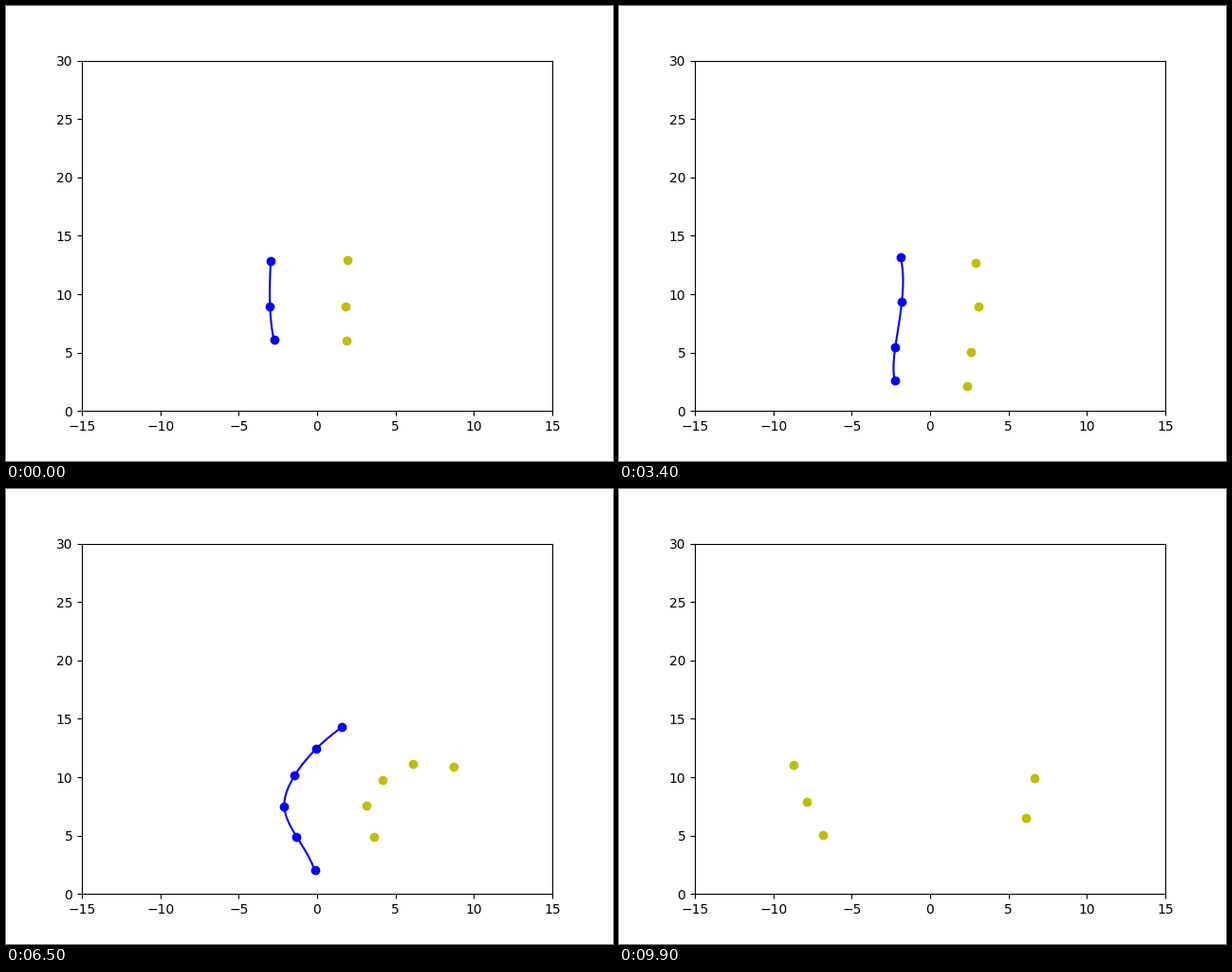
Recreate the animation shown at these times as a matplotlib script. Size 640x480 px, loop 10 s.

```python
import numpy as np
import matplotlib.pyplot as plt
from matplotlib.animation import FuncAnimation

FRAMES, STEP = 100, 100
RANGE, SLOPE = 14.9, 0.727   # sensor reach and edge of its field of view


def glide(t, times, points):
    """Smooth motion through key points, starting from rest."""
    times, points = np.asarray(times, float), np.asarray(points, float)
    rates = np.gradient(points, times, axis=0)
    rates[0] = 0
    t = np.clip(t, times[0], times[-1])
    i = min(np.searchsorted(times, t, side="right") - 1, len(times) - 2)
    h = times[i + 1] - times[i]
    s = (t - times[i]) / h
    rise = s * s * (3 - 2 * s)
    return ((1 - rise) * points[i] + rise * points[i + 1]
            + h * s * (1 - s) * ((1 - s) * rates[i] - s * rates[i + 1]))


def cone_row(*points):
    """Cones along a border: three given, then one between each pair of points."""
    numbers = np.r_[0, 1, 2 * np.arange(1, len(points) - 1)]
    return np.array([glide(k, numbers, points) for k in range(numbers[-1] + 1)])


BLUE = cone_row((-2.75, 6.1), (-3, 8.95), (-2.95, 12.85), (-4.18, 20.11),
                (-6.27, 25.57), (-4.37, 30.53), (-0.61, 33.69), (5.82, 33.54),
                (11.6, 31), (16.4, 27.1))
YELLOW = cone_row((1.88, 6.05), (1.83, 8.95), (1.95, 12.9), (0.6, 19.94),
                  (-1.04, 25.78), (1.8, 29.37), (7.25, 28.4), (11.98, 26.25),
                  (16.01, 21.46))

# Car drive: seconds -> x, y, heading
DRIVE = {1.4: (0, 0, 0), 3.4: (-0.28, 3.7, 0.094), 5.7: (-2.99, 13.74, 0.34),
         7.2: (-4.12, 22.63, -0.29), 8.4: (-1.18, 32.64, -0.653),
         9.9: (3.72, 28.29, -2.745)}


def seen(cones, pose):
    """Cones inside the field of view, in car coordinates."""
    x, y, a = pose
    d = cones - (x, y)
    c, s = np.cos(a), np.sin(a)
    rel = np.column_stack((c * d[:, 0] + s * d[:, 1], c * d[:, 1] - s * d[:, 0]))
    ahead = rel[:, 1] > SLOPE * np.abs(rel[:, 0])
    return rel[ahead & (np.hypot(*rel.T) < RANGE)]


def spline(pts):
    """Interpolating spline over the cone number, cubic where possible."""
    n = len(pts)
    if n < 2:
        return np.empty((0, 2))

    def basis(v):
        powers = [v ** k for k in range(min(4, n))]
        bends = [np.clip(v - k, 0, None) ** 3 for k in range(2, n - 2)]
        return np.column_stack(powers + bends)

    fit = np.linalg.solve(basis(np.arange(float(n))), pts)
    return basis(np.linspace(0, n - 1, 100)) @ fit


def border(pts):
    """Spline through each unbroken run of cones."""
    gaps = np.hypot(*np.diff(pts, axis=0).T) > 6
    parts = []
    for run in np.split(pts, np.flatnonzero(gaps) + 1):
        parts += [spline(run), np.full((1, 2), np.nan)]
    return np.vstack(parts)


fig, ax = plt.subplots(figsize=(6.4, 4.8), dpi=100)
ax.set_xlim(-15, 15)
ax.set_ylim(0, 30)
left, = ax.plot([], [], "bo")
right, = ax.plot([], [], "yo")
curve, = ax.plot([], [], "b-")


def update(frame):
    pose = glide(frame * STEP / 1000, list(DRIVE), list(DRIVE.values()))
    blue = seen(BLUE, pose)
    left.set_data(*blue.T)
    right.set_data(*seen(YELLOW, pose).T)
    curve.set_data(*border(blue).T)
    return left, right, curve


anim = FuncAnimation(fig, update, frames=FRAMES, interval=STEP,
                     repeat=True, repeat_delay=0)
plt.show()
```
